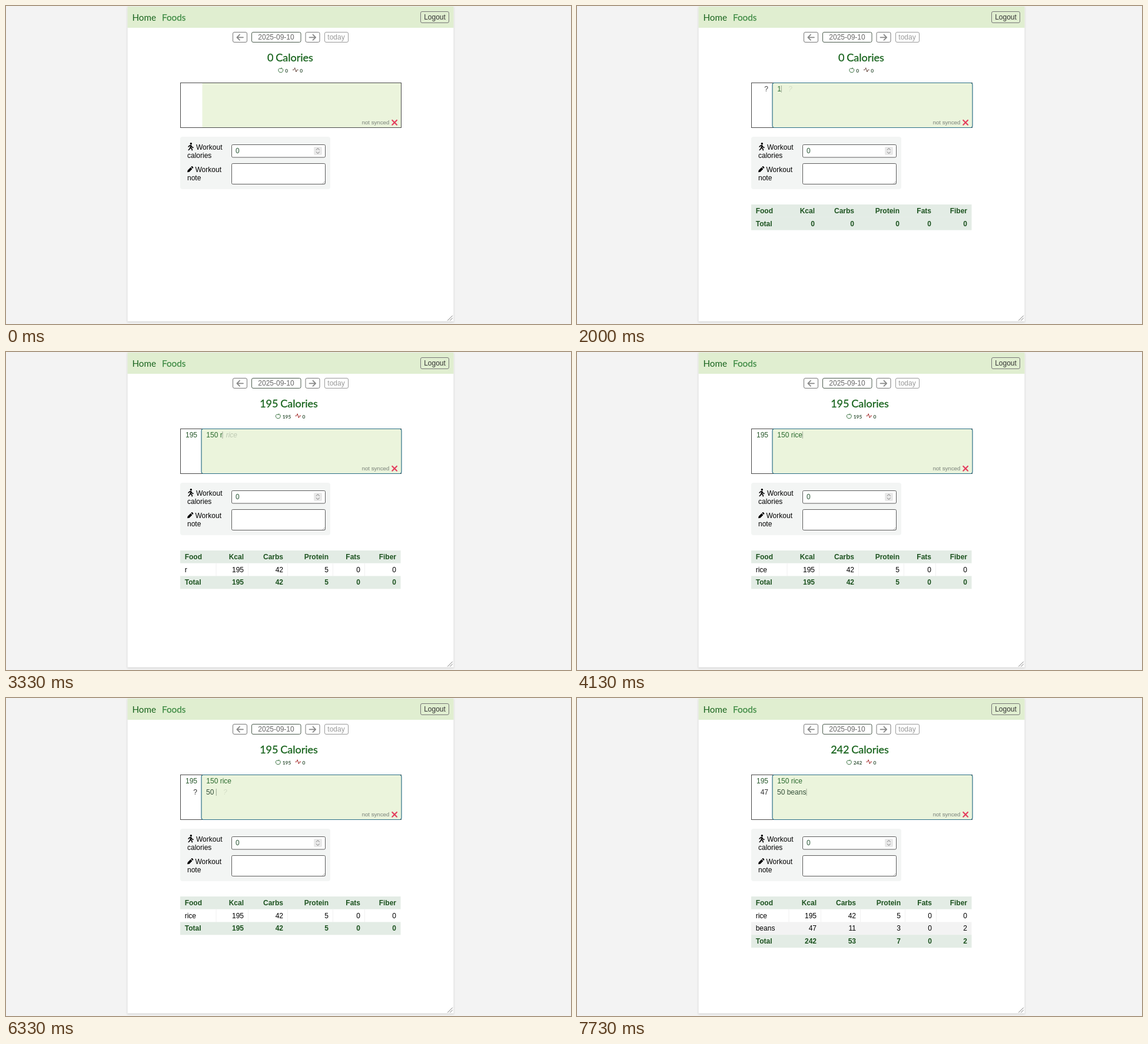
Write an HTML page that moves like this. It is 960 by 540 pixels and loops after 8 s.

```html
<!DOCTYPE html>
<html lang="en">
<head>
<meta charset="utf-8">
<title>Calorie diary</title>
<style>
  html, body { margin: 0; width: 100%; height: 100%; overflow: hidden; background: #f3f3f3; }
  svg { display: block; width: 100%; height: 100%; }
  text { font: 12px "Liberation Sans", Arial, sans-serif; white-space: pre; }
  .brand { font-family: Lato, sans-serif; font-size: 15.2px; }
  .title { font-family: Lato, sans-serif; font-size: 18px; fill: #17631c; stroke: #17631c; stroke-width: .3px; }
  .mini { font-family: Lato, sans-serif; font-size: 8.4px; font-weight: 700; fill: #35543a; }
  .hint { font-style: italic; }
  .b { font-weight: 700; fill: #1c521f; }
  .end { text-anchor: end; }
  .mid { text-anchor: middle; }
  .line { fill: none; stroke-linecap: round; stroke-linejoin: round; }
</style>
</head>
<body>
<svg viewBox="0 0 960 540" xmlns="http://www.w3.org/2000/svg">
  <defs>
    <filter id="soft" x="-5%" y="-5%" width="110%" height="110%"><feGaussianBlur stdDeviation="1.5"/></filter>
  </defs>
  <rect width="960" height="540" fill="#f3f3f3"/>
  <rect x="206" y="2" width="555" height="535" fill="#d4d4d4" filter="url(#soft)"/>
  <rect x="206.5" y="1" width="554" height="534.5" fill="#fff"/>
  <rect x="206.5" y="1" width="554" height="36" fill="#e0eed0"/>
  <path d="M750.5 534L758.5 526M754.5 534L758.5 530" class="line" stroke="#777"/>

  <text x="214.5" y="25" class="brand" font-weight="700" fill="#17631c">Home</text>
  <text x="265" y="25" class="brand" fill="#3d8a43" stroke="#3d8a43" stroke-width=".25">Foods</text>

  <g fill="none" stroke="#777">
    <rect x="704.5" y="9.5" width="48" height="19" rx="2.5"/>
    <rect x="385.5" y="44.5" width="24" height="17" rx="2.5"/>
    <rect x="417.5" y="44.5" width="83.500" height="17" rx="2.5" stroke="#4c5c4e"/>
    <rect x="509" y="44.5" width="24" height="17" rx="2.5"/>
    <rect x="541.5" y="44.5" width="40" height="17" rx="2.5" stroke="#999"/>
  </g>
  <text x="728.500" y="23" class="mid" fill="#333">Logout</text>
  <text x="459" y="57" class="mid" fill="#666">2025-09-10</text>
  <text x="561" y="57" class="mid" fill="#999">today</text>
  <path d="M403 53.300H392.500M397 48.700L392.400 53.300L397 57.900M515.500 53.300H526M521.500 48.700L526.100 53.300L521.500 57.900" class="line" stroke="#888" stroke-width="1.800"/>

  <text id="sum" y="94" class="title end"></text>
  <text id="word" y="94" class="title">Calories</text>
  <path id="apple" class="line" stroke="#2f6b36" d="M4.500 2C3 1 .6 1.500 .6 4.200C.6 6.800 2.200 8.400 4.500 8.300C6.800 8.400 8.400 6.800 8.400 4.200C8.400 1.500 6 1 4.500 2L5.800 .4"/>
  <text id="eaten" y="113" class="mini"></text>
  <path id="pulse" class="line" d="M0 4.500H1.800L3.400 .8L5.600 8L7 4.500H9"/>
  <text id="burnt" y="113" class="mini">0</text>

  <rect x="296.500" y="130.500" width="375" height="76" fill="#fff" stroke="#4a4a4a"/>
  <rect id="field" y="131" height="75.500" fill="#ebf4dc"/>
  <text id="k0" x="325" y="145" class="end"></text>
  <text id="k1" x="325" y="164" class="end" fill="#333"></text>
  <text id="l0" x="340.300" y="145" fill="#2a6a2e"></text>
  <text id="l1" x="340" y="164" fill="#355039"></text>
  <text id="hint" class="hint"></text>
  <rect id="caret" width="1" height="12" fill="#9aa893"/>
  <text x="604.500" y="201" fill="#8f978c" stroke="#8f978c" stroke-width=".2" style="font-size:9.7px">not synced</text>
  <path d="M656.300 194L664 201.700M664 194L656.300 201.700" class="line" stroke="#e4405f" stroke-width="2.200"/>

  <rect x="296" y="222" width="255" height="89" rx="4" fill="#f3f5f4"/>
  <circle cx="314.300" cy="233.700" r="1.700"/>
  <path d="M310 239L312.300 236.800L314.500 236.800L315.300 239.300L318 240.300M314 237.500L313.200 240.500L315.600 242.200L316.300 244.800M313 241L311.800 243L310.200 244.500" class="line" stroke="#000" stroke-width="1.600"/>
  <path d="M308 282.300L308.700 278.900L313.600 274L316.400 276.800L311.500 281.700ZM314.300 273.300L315.400 272.200Q316 271.700 316.700 272.300L318.100 273.700Q318.600 274.400 318.100 275L317.100 276.100Z"/>
  <text x="323" y="244">Workout</text><text x="308" y="258">calories</text>
  <text x="321.500" y="282">Workout</text><text x="308" y="296">note</text>
  <g fill="#fff" stroke="#5d5d5d">
    <rect x="383.500" y="235.500" width="159" height="21.500" rx="2"/>
    <rect x="383.500" y="267.500" width="159" height="35" rx="2"/>
  </g>
  <text x="390" y="250" fill="#2d5a3a">0</text>
  <rect x="523" y="239" width="14" height="14" rx="2" fill="#e9e9e9"/>
  <path d="M527.200 244.300L529.800 241.600L532.400 244.300M527.200 247.800L529.800 250.500L532.400 247.800" class="line" stroke="#777"/>
  <path d="M538 301.500L541.500 298M540.500 301.500L541.500 300.500" class="line" stroke="#888" stroke-width=".7"/>
  <g id="table"></g>
</svg>
<script>
const LOOP = 8000, FOCUS = 1270;
const $ = id => document.getElementById(id);
const pen = document.createElement('canvas').getContext('2d');
pen.font = '12px "Liberation Sans", Arial, sans-serif';

// [time, first line, second line]
const typed = [
  [0, ''], [1670, '1'], [2270, '15'], [2670, '150'], [2870, '150 '], [3230, '150 r'],
  [3530, '150 ri'], [3800, '150 ric'], [4100, '150 rice'],
  [4870, '150 rice', ''], [5570, '150 rice', '5'], [5930, '150 rice', '50'],
  [6270, '150 rice', '50 '], [6400, '150 rice', '50 b'], [6600, '150 rice', '50 be'],
  [6870, '150 rice', '50 bea'], [7270, '150 rice', '50 bean'], [7600, '150 rice', '50 beans']
];
const foods = { rice: [195, 42, 5, 0, 0], beans: [47, 11, 3, 0, 2] };
const totals = [[0, 0, 0, 0, 0], foods.rice, [242, 53, 7, 0, 2]];
const heads = ['Kcal', 'Carbs', 'Protein', 'Fats', 'Fiber'];

const label = (x, y, s, cls) => `<text x="${x}" y="${y}" class="${cls}">${s}</text>`;
const box = (x, y, w, h, fill) => `<rect x="${x}" y="${y}" width="${w}" height="${h}" fill="${fill}"/>`;

function set(id, attrs) {
  for (const k in attrs) $(id).setAttribute(k, attrs[k]);
}
function write(id, s) {
  if ($(id).textContent !== s) $(id).textContent = s;
}
function parse(line) {
  const name = (line || '').split(' ')[1];
  const food = name && Object.keys(foods).find(f => f.startsWith(name));
  return { name, food };
}

function tableMarkup(items) {
  const cols = items.some(i => i.name === 'beans') ? [407, 474, 550, 603, 663] : [404, 471, 548, 602, 663];
  const rows = [['Food', heads, 'b'],
    ...items.map(i => [i.name, foods[i.food], '']),
    ['Total', totals[items.length], 'b']];
  return rows.map(([name, cells, cls], i) => {
    const y = 337 + i * 21.7, base = 352 + i * 21.7;
    const fill = cls ? '#e3ece5' : i === 1 ? '#fff' : '#f3f3f3';
    let out = box(296, y, 374.5, 21.9, fill);
    if (i === 1 && !cls) out += [cols[0] - 47.5, ...cols.slice(0, 4).map(x => x + 7)].map(x => box(x, y, 1, 21.7, '#f1f1f1')).join('');
    return out + label(303.7, base, name, cls) + cells.map((c, j) => label(cols[j], base, c, cls + ' end')).join('');
  }).join('');
}

let tableKey = null;
function drawTable(items, shown) {
  const key = shown ? items.map(i => i.name).join() : 'none';
  if (key === tableKey) return;
  tableKey = key;
  $('table').innerHTML = shown ? tableMarkup(items) : '';
}

function render(t) {
  const [since, ...lines] = typed.filter(e => e[0] <= t).pop();
  const started = lines[0] !== '', focused = t >= FOCUS;
  const parsed = lines.map(parse);
  const items = parsed.filter(p => p.food);
  const total = totals[items.length][0], wide = total > 0;

  write('sum', String(total));
  set('sum', { x: wide ? 462.5 : 454.5 });
  set('word', { x: wide ? 466.3 : 458.3 });
  write('eaten', String(total));
  set('eaten', { x: wide ? 469.7 : 474.2 });
  set('burnt', { x: wide ? 503.5 : 499.2 });
  set('apple', { transform: `translate(${wide ? 457.8 : 462.3} 104.5)` });
  set('pulse', { transform: `translate(${wide ? 491.8 : 487.3} 104)`, stroke: wide ? '#a52a2a' : '#6b4a40' });

  set('field', focused
    ? { x: 332, y: 130.5, width: 340, height: 76, rx: 3.5, stroke: '#2b6f86', 'stroke-width': 1.2 }
    : { x: 333.5, y: 131, width: 337.5, height: 75, rx: 0, stroke: 'none' });

  for (const i of [0, 1]) {
    const p = parsed[i];
    write('l' + i, lines[i] || '');
    write('k' + i, !p || !started ? '' : p.food ? String(foods[p.food][0]) : '?');
  }
  set('k0', { fill: items.length ? '#2a5a2e' : '#444' });

  const row = lines.length - 1, line = lines[row], last = parsed[row];
  const x = 340.3 + pen.measureText(line).width;
  const hint = !line || last.name === last.food && last.food ? '' : last.food || '?';
  write('hint', hint);
  set('hint', { x: x + (last.food ? 6 : 12), y: 145 + row * 19, fill: last.food ? '#bfcab4' : '#d3ddc6' });

  const base = Math.max(since, FOCUS);
  set('caret', { x: x - .2, y: 135 + row * 19, opacity: focused && (t - base) % 1000 < 530 ? 1 : 0 });
  drawTable(items, started);
}

const start = performance.now();
function tick() {
  render((performance.now() - start) % LOOP);
  requestAnimationFrame(tick);
}
tick();
</script>
</body>
</html>
```
